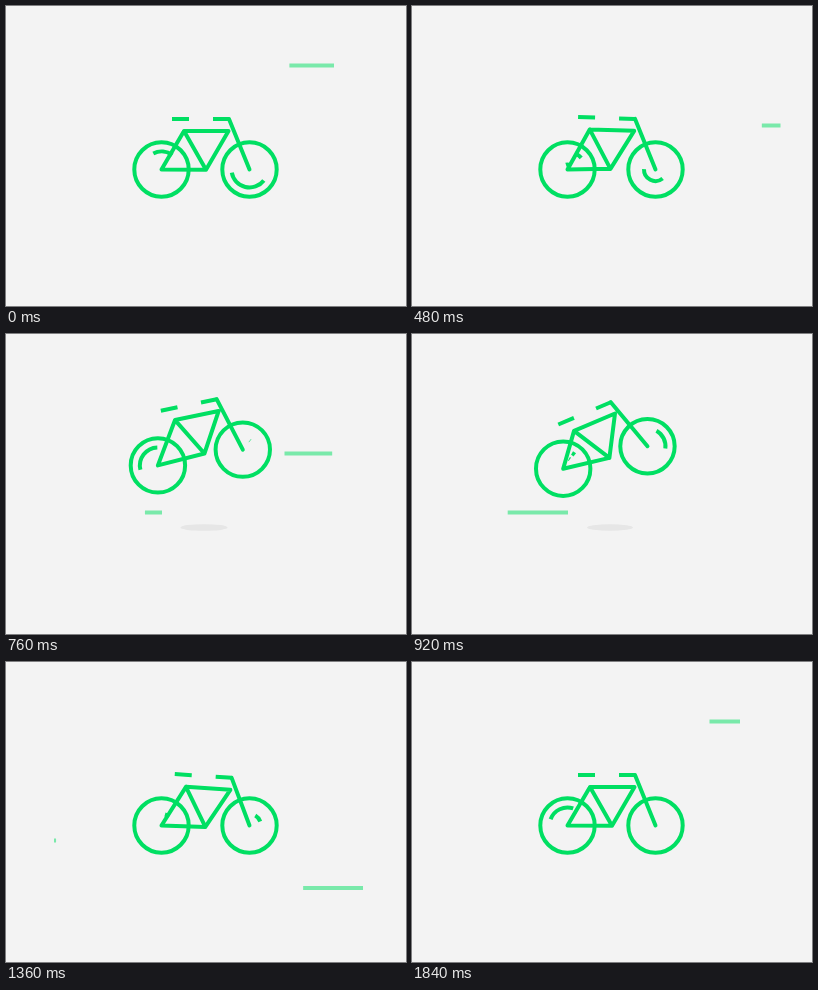
These frames come from a looping animation (400 by 300 pixels, 1880 ms). An HTML page:

```html
<!DOCTYPE html>
<html lang="en">
<head>
<meta charset="utf-8">
<title>Jumping bicycle</title>
<style>
  html, body { margin: 0; width: 100%; height: 100%; overflow: hidden; background: #f3f3f3; }
  svg { display: block; width: 100vw; height: 100vh; }
</style>
</head>
<body>
<svg id="stage" viewBox="0 0 400 300" fill="none" stroke="#00df62" stroke-width="4" stroke-linejoin="round"></svg>
<script>
const LOOP = 1880, STEP = 40;
const stage = document.getElementById('stage');

function set(node, attrs) {
  for (const key in attrs) node.setAttribute(key, attrs[key]);
}
function add(tag, attrs = {}) {
  const node = document.createElementNS('http://www.w3.org/2000/svg', tag);
  set(node, attrs);
  stage.append(node);
  return node;
}

const progress = (t, start, end) => Math.min(1, Math.max(0, (t - start) / (end - start)));

// Rises from 0 to 1 and falls back to 0 between two times.
const bump = (t, start, end, power = 1) =>
  Math.max(0, Math.sin(Math.PI * progress(t, start, end))) ** power;

// Ease in and out; a higher skew moves the fast part forward.
function ease(t, start, end, skew = 1) {
  const u = 1 - (1 - progress(t, start, end)) ** skew;
  return u * u * (3 - 2 * u);
}

function polar([x, y], radius, degrees) {
  const a = degrees * Math.PI / 180;
  return [x + radius * Math.cos(a), y + radius * Math.sin(a)];
}
const line = (...points) => 'M' + points.map(p => p.map(n => n.toFixed(2)).join(' ')).join('L');

// Crouch, leap, land and settle.
function bodyPose(t) {
  return {
    x: 178 - 0.7 * bump(t, 0, 560) - 16 * bump(t, 620, 1240, 1.35) + 2 * bump(t, 1240, 1520),
    y: 125 + 8.2 * bump(t, 0, 570, 1.5) - 39 * bump(t, 450, 1095, 1.15)
      + 7 * bump(t, 1060, 1350) - 1.3 * bump(t, 1350, 1640),
    tilt: 4.8 * bump(t, 440, 760) - 23 * bump(t, 640, 1190, 1.47) + 3.8 * bump(t, 1190, 1530)
  };
}
function wheelAxles(t) {
  const drift = bump(t, 520, 1240, 1.4);
  return [
    [155.5 - 4.4 * drift, 163.5 - 34 * bump(t, 520, 1120, 1.15)],
    [243.5 - 8.2 * drift, 163.5 - 54.3 * bump(t, 530, 1180, 1.15)]
  ];
}

const streaks = [
  { x: 328, y: 59.5, length: 121, start: -197, life: 665 },
  { x: 368.5, y: 119.5, length: 90, start: 366, life: 540 },
  { x: 156, y: 178.5, length: 108, start: 620, life: 773 },
  { x: 357, y: 226, length: 120, start: 1112, life: 690 }
];

// Each spin is an outer arc followed by an inner one.
const spins = [
  { wheel: 0, start: -407, inner: 5 },
  { wheel: 0, start: 420, inner: 11.5 },
  { wheel: 0, start: 1473, inner: 11.5 },
  { wheel: 1, start: -250, inner: 11.5 },
  { wheel: 1, start: 803, inner: 11.5 }
];
const arcs = spins.flatMap(({ wheel, start, inner }) => [
  { wheel, start, radius: 18 },
  { wheel, start: start + 470, radius: inner }
]);

const shadow = add('ellipse', { cx: 198, cy: 193.5, fill: '#e6e6e6', stroke: 'none' });
for (const streak of streaks) streak.node = add('path', { 'stroke-opacity': 0.5 });
const rims = [0, 1].map(() => add('circle', { r: 27.2 }));
for (const arc of arcs) arc.node = add('path');
const frame = add('path', { 'stroke-linecap': 'round' });
const grips = add('path');

function drawStreak({ node, x, y, length, start, life }, t) {
  const age = (t - start + LOOP) % LOOP / life;
  const head = length * ease(age, 0, 0.72), tail = length * ease(age, 0.48, 1);
  set(node, { d: head - tail > 0.3 ? line([x - tail, y], [x - head, y]) : '' });
}

function drawArc({ node, wheel, radius, start }, t, axles) {
  const age = t - start;
  const head = -60 + 370 * ease(age, 0, 430), tail = -60 + 370 * ease(age, 140, 600, 1.5);
  if (head - tail < 1) return set(node, { d: '' });
  const from = polar(axles[wheel], radius, tail), to = polar(axles[wheel], radius, head);
  const large = head - tail > 180 ? 1 : 0;
  set(node, { d: `M${from}A${radius} ${radius} 0 ${large} 1 ${to}` });
}

function drawBike(t, axles) {
  const { x, y, tilt } = bodyPose(t);
  const a = tilt * Math.PI / 180, cos = Math.cos(a), sin = Math.sin(a);
  const at = (dx, dy) => [x + dx * cos - dy * sin, y + dx * sin + dy * cos];
  const top = at(0, 0), crank = at(22, 38.7), stem = at(45, -12);

  set(frame, { d: line(crank, axles[0], top, at(44.5, 0), crank, top) + line(stem, axles[1]) });
  set(grips, { d: line(at(-12, -12), at(5, -12)) + line(at(29, -12), stem) });
  rims.forEach((rim, i) => set(rim, { cx: axles[i][0], cy: axles[i][1] }));
}

function draw(t) {
  const axles = wheelAxles(t), size = bump(t, 560, 1110);
  set(shadow, { rx: 26 * size, ry: 3.7 * size });
  for (const streak of streaks) drawStreak(streak, t);
  for (const arc of arcs) drawArc(arc, t, axles);
  drawBike(t, axles);
}

const began = performance.now();
function tick() {
  const t = (performance.now() - began) % LOOP;
  draw(Math.floor(t / STEP) * STEP);
  requestAnimationFrame(tick);
}
tick();
</script>
</body>
</html>
```
